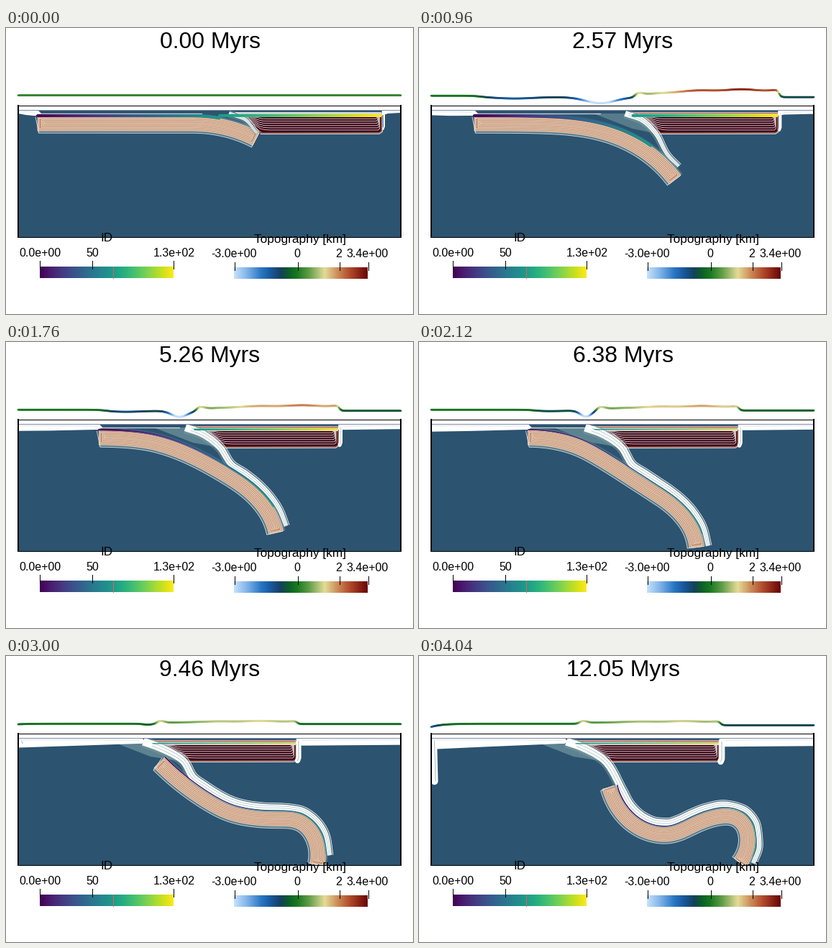
Write a matplotlib script that moves like this. It is 566 px wide and 398 px high and loops after 4.08 s.

```python
import numpy as np
import matplotlib.pyplot as plt
from matplotlib.animation import FuncAnimation
from matplotlib.collections import LineCollection
from matplotlib.colors import LinearSegmentedColormap, Normalize
from matplotlib.patches import Polygon, Rectangle

W, H, DPI = 566, 398, 100
FRAMES, STEP = 102, 40
PX = 72 / DPI
LEFT, RIGHT, TOP, BOTTOM = 17, 549, 107.5, 290.5

MANTLE = "#2c5370"
TAN = "#c8936f"
MAROON = "#3c0618"
RED = "#b5503a"
TEAL = "#7fa3a6"
LINE = "#f4f1ee"

plt.rcParams["font.family"] = "Liberation Sans"
viridis = plt.get_cmap("viridis")
topo_cmap = LinearSegmentedColormap.from_list("topo", [
    (0, "#c4e0fa"), (.09, "#84b6ea"), (.2, "#2a77c4"), (.27, "#175a9e"),
    (.35, "#16405f"), (.40, "#0c5a2c"), (.47, "#17781f"), (.56, "#5f9c48"),
    (.68, "#e4dc98"), (.78, "#cb8a58"), (.87, "#b04a2c"), (1, "#6a0606")])


# ---------- maths ----------
def monotone(xk, v, xq):
    """Smooth interpolation without overshoot, column by column."""
    xk, xq = np.asarray(xk, float), np.atleast_1d(xq)
    v = np.asarray(v, float).reshape(len(xk), -1)
    d = np.diff(v, axis=0) / np.diff(xk)[:, None]
    prod, total = d[:-1] * d[1:], d[:-1] + d[1:]
    mid = np.where(prod > 0, 2 * prod / np.where(prod > 0, total, 1), 0)
    m = np.vstack([d[:1], mid, d[-1:]])
    i = np.clip(np.searchsorted(xk, xq, side="right") - 1, 0, len(xk) - 2)
    h = (xk[i + 1] - xk[i])[:, None]
    t = (xq - xk[i])[:, None] / h
    return (v[i] * (1 + 2 * t) * (1 - t) ** 2 + h * m[i] * t * (1 - t) ** 2
            + v[i + 1] * t * t * (3 - 2 * t) + h * m[i + 1] * t * t * (t - 1))


def bump(x, centre, width):
    return np.exp(-((x - centre) / width) ** 2)


def rise(x, centre, width):
    return .5 + .5 * np.tanh((x - centre) / width)


def curve(pts, n=100):
    pts = np.asarray(pts, float)
    s = np.r_[0, np.cumsum(np.hypot(*np.diff(pts, axis=0).T))]
    return monotone(s, pts, np.linspace(0, s[-1], n))


def offset(path, d):
    t = np.gradient(path, axis=0)
    t /= np.hypot(t[:, 0], t[:, 1])[:, None]
    return path + np.reshape(d, (-1, 1)) * np.c_[t[:, 1], -t[:, 0]]


def ring(path, d, inset=0):
    """Loop at distance d around a path, shortened at both ends."""
    k = int(inset / np.hypot(*(path[1] - path[0])))
    cut = slice(k, len(path) - k)
    return np.vstack([offset(path, d)[cut], offset(path, -d)[cut][::-1]])


# ---------- model ----------
KEYS = [0, 14, 34, 53, 66, 84, 101]
MYRS = [0, 1.23, 4.03, 6.38, 8.25, 10.54, 12.05]
RETREAT = [0, 9, 42, 79, 112, 122, 105]

# dip of the slab in degrees, evenly spaced from its rear to its tip,
# at a few amounts of convergence
CLOSURE = [0, 60, 107, 145, 221]
DIPS = [[0, 0, 0, 0, 0, 12, 28],
        [0, 1, 5, 17, 32, 49, 70],
        [0, 14, 30, 33, 33, 50, 84],
        [30, 32, 33, 22, 6, 52, 95],
        [75, 46, 11, -26, -8, 74, 130]]


class State:
    """Geometry of the model at one frame."""

    def __init__(self, f):
        self.t = t = monotone(KEYS, MYRS, f)[0, 0]
        back = monotone(KEYS, RETREAT, f)[0, 0]
        self.closure = 20 * (t - 1 + np.exp(-t))
        self.slab = self.slab_path()
        # overriding plate: upper left, lower left, right
        self.a = 328 - back
        self.b = self.a + 28 + .14 * back
        self.r = 522 - back
        # surface landmarks
        self.basin = 12 + 38 * np.exp(-(t / 5) ** 4)
        self.arc = 322 - .95 * back
        self.trench = self.arc - self.basin
        self.edge = min(self.slab[0, 0], self.trench - 8)

    def slab_path(self, n=170):
        dips = monotone(CLOSURE, DIPS, self.closure)[0]
        angle = np.radians(monotone(np.linspace(0, 1, 7), dips,
                                    np.linspace(0, 1, n))[:, 0])
        step = (307 - 1.9 * self.t) / (n - 1)
        start = 44 + self.closure, 133 + 1.45 * max(self.t - 6.2, 0) ** 2
        move = step * np.c_[np.cos(angle), np.sin(angle)][:-1]
        return start + np.vstack([[0, 0], np.cumsum(move, axis=0)])

    def channel(self):
        above = offset(self.slab, 16)
        deep = above[(above[:, 1] > 155) & (above[:, 0] > self.b - 4)]
        return curve([(self.a - 18, 119), (self.a + 4, 127),
                      (self.b - 7, 146), *deep[8::12]])

    def topography(self, x):
        t = self.t
        late = rise(t, 10.3, 1)
        u = np.clip((x - self.arc) / (self.r - self.arc), 0, 1)
        on_plate = rise(x, self.arc, 4) * rise(-x, -self.r - 2, 3)
        high = 1.1 + 2.1 * np.exp(-(t / 5.5) ** 2)
        land = .3 + (high - .3) * np.sin(np.pi / 2 * np.minimum(u / .7, 1))
        land += .12 * high * np.sin(19 * u) * u + bump(x, self.arc + 5, 9)
        flex = self.edge + .32 * (self.trench - self.edge)
        sea = 2.8 * rise(8.7, t, .8) * bump(x, self.trench, .55 * self.basin + 3)
        sea += 1.3 * np.exp(-(t / 7) ** 4) * rise(x, self.edge + 8, 12) * (
            .5 + .5 * bump(x, flex, 35))
        sea += 1.5 * late * np.exp((LEFT - x) / 15)
        sea += .7 * late * rise(x, self.r, 4)
        grown = 1 - np.exp(-t / .5)
        return .2 - .2 * grown + grown * (on_plate * land - (1 - on_plate) * sea)


# ---------- stage ----------
fig = plt.figure(figsize=(W / DPI, H / DPI), dpi=DPI, facecolor="white")
ax = fig.add_axes([0, 0, 1, 1])
ax.axis("off")


def label(x, y, s, size=16):
    return ax.text(x, y, s, fontsize=size * PX, ha="center", va="baseline",
                   color="black", zorder=30)


def color_bar(cmap, x, y, ticks, labels):
    ax.imshow(np.linspace(0, 1, 256)[None], cmap=cmap, aspect="auto",
              extent=(x, x + 186, y + 16, y))
    for tx in ticks:
        ax.plot([tx, tx], [y - 8, y + 3], color="black", lw=PX)
    for tx, s in labels:
        label(tx, y - 14.5, s)


color_bar(viridis, 47, 332, [46.5, 119.5, 232.5],
          [(47, "0.0e+00"), (120, "50"), (233.5, "1.3e+02")])
color_bar(topo_cmap, 317, 333.5, [317.5, 405.5, 463.5, 503.5],
          [(317.5, "-3.0e+00"), (405, "0"), (463, "2"), (503, "3.4e+00")])
ax.plot([148.5, 148.5], [332, 348], color="#e0605c", lw=PX)
label(140, 297, "ID", 17)
label(409, 299, "Topography [km]", 17.2)
title = label(283.5, 28, "", 32)

box = Rectangle((LEFT, TOP), RIGHT - LEFT, BOTTOM - TOP, fc=MANTLE, ec="none")
ax.add_patch(box)
for y in (TOP, BOTTOM):
    ax.plot([LEFT, RIGHT], [y, y], color="black", lw=PX, zorder=20)
for x in (LEFT, RIGHT):
    ax.plot([x, x], [TOP, BOTTOM], color="black", lw=2 * PX, zorder=20)
ax.set(xlim=(0, W), ylim=(H, 0))

live = []


def keep(artist, clip=True):
    if clip:
        artist.set_clip_path(box)
    live.append(artist)


def fill(pts, color, alpha=1.0, z=3):
    keep(ax.add_patch(Polygon(pts, fc=color, ec="none", alpha=alpha, zorder=z)))


def stroke(pts, color, w=1.0, alpha=1.0, z=3):
    pts = np.asarray(pts)
    keep(ax.plot(pts[:, 0], pts[:, 1], color=color, lw=w * PX, alpha=alpha,
                 zorder=z, solid_capstyle="round", solid_joinstyle="round")[0])


def shaded(pts, values, cmap, norm, w, clip=True):
    segs = np.stack([pts[:-1], pts[1:]], axis=1)
    lc = LineCollection(segs, cmap=cmap, norm=norm, linewidths=w * PX,
                        zorder=12, capstyle="round")
    lc.set_array((values[:-1] + values[1:]) / 2)
    lc.set_snap(False)
    keep(ax.add_collection(lc, autolim=False), clip)


def draw_slab(s):
    fill([(s.a - 62, 119), (s.a - 12, 119), (s.b - 6, 147), (s.a - 8, 140)],
         TEAL, .6 * min(s.t / 3, 1))
    for d, alpha in ((14, .15), (12.8, .3), (11.8, .5)):
        fill(ring(s.slab, d), TEAL, alpha)
    fill(ring(s.slab, 10.5), TAN)
    for d in (9.8, 7.6, 5.4, 3.2, 1):
        loop = ring(s.slab, d, 11 - d)
        stroke(np.vstack([loop, loop[:1]]), LINE, .8, .85)
    under, head = offset(s.slab, -13.2), offset(s.slab, 9)
    stroke(np.vstack([head[:1] - [3, 0], under[1:], offset(s.slab, 9)[-1:]]),
           LINE, .9, .85)


def draw_plate(s):
    a, b, r = s.a, s.b, s.r
    body = [(a, 123.5), (r, 123.5), (r, 144), (r - 3, 145.5), (b, 146)]
    loop = np.array(body + body[:1])
    stroke(loop, TEAL, 5, .4)
    fill(body, MAROON)
    stroke(loop, RED, 1.2)
    for u in np.linspace(.12, .9, 6):
        y, gap = 124 + 20 * u, 22 * (1 - u)
        x, end = a + (b - a) * u + gap, r - 2 - gap / 5
        stroke([(a + 2 + gap * .8, 124), (x - 2, y - 2), (x + 5, y - .3),
                (x + 12, y), (end - 2, y), (end, y - 2), (end, 124)],
               LINE, .8, .9)
    stroke([(b - 2, 147.5), (r - 3, 147.3), (r + 1.5, 144), (r + 2, 122)],
           LINE, .9, .9)
    fill([(a - 10, 117), (r, 117), (r, 123.5), (a, 123.5)], LINE, .85)
    stroke([(a - 12, 118), (r - 1, 118)], RED, 1.3, min(1, s.t / 3))
    stroke([(a - 8, 119.8), (r - 1, 119.8)], TEAL, .7)


def draw_channel(s):
    path = s.channel()
    width = 5 + 5 * min(s.t / 6, 1)
    half = width / 2 * np.linspace(1.1, .6, len(path))
    fill(np.vstack([offset(path, half + 2), offset(path, -half - 3)[::-1]]),
         TEAL, .45)
    fill(np.vstack([offset(path, half), offset(path, -half)[::-1]]), "white")
    for c in (-.35, .4):
        stroke(offset(path, c * half)[4:], TEAL, .6, .8)
    stroke(offset(path, half + 1.8)[15:], LINE, .8)


def draw_crust(s):
    end, r, t = s.edge, s.r, s.t
    base = 119 + .9 * t
    fill([(LEFT, TOP), (RIGHT, TOP), (RIGHT, 114.5), (LEFT, 114.5)], "white", z=6)
    fill([(LEFT, 114), (end, 114), (end + 5, 119), (end, 122), (end - 6, 122),
          (.6 * LEFT + .4 * end, (base + 123) / 2), (LEFT, base)], "white", z=6)
    fill([(RIGHT, 114), (r + 1, 114), (r, 122), (r + 9, 119 + .6 * t),
          (RIGHT, 118 + .6 * t)], "white", z=6)
    stroke([(end, 118.8), (s.trench, 118.8)], LINE, 1.3, .8, 6)
    stroke([(LEFT, 113.8), (RIGHT, 113.8)], "#75809f", .9, 1, 8)
    stroke([(LEFT, 116.5), (end - 3, 117)], TEAL, .5, .6, 8)
    stroke([(r + 8, 117), (RIGHT, 116.5)], TEAL, .5, .6, 8)
    # drips at the wall and behind the plate
    sink = 4.3 * max(t - 8.4, 0) ** 2
    if sink > 3:
        wall = np.array([(LEFT + 3, 118), (LEFT + 4.5, 117 + sink)])
        stroke(wall, "white", 10, z=6)
        stroke(wall + [1.5, 0], TEAL, .7, z=7)
    rear = np.array([(r + 4, 119), (r + 4, 137 + .5 * t), (r + 2.5, 141 + .5 * t)])
    stroke(rear, "white", 2 + .55 * t, z=6)
    stroke(rear, TEAL, .7, min(t / 8, 1), z=7)


def draw_markers(s):
    ids = Normalize(0, 130)
    thin = rise(s.t, 5.2, .5)
    w = 4 - 2.7 * thin
    n = int((.82 + .13 * thin) * len(s.slab))
    shaded(offset(s.slab, 11)[:n], np.linspace(0, 68, n), viridis, ids, w)
    x = np.linspace(s.a - 26 * np.exp(-s.t) - 5, s.r - 1, 60)
    shaded(np.c_[x, np.full(60, 121.8)], np.linspace(70, 130, 60),
           viridis, ids, w)


def draw(f):
    while live:
        live.pop().remove()
    s = State(f)
    title.set_text(f"{s.t:.2f} Myrs")
    x = np.linspace(LEFT, RIGHT, 267)
    km = s.topography(x)
    shaded(np.c_[x, 94.3 - 3 * km], km, topo_cmap, Normalize(-3, 3.4), 2.8,
           clip=False)
    draw_slab(s)
    draw_plate(s)
    draw_channel(s)
    draw_crust(s)
    draw_markers(s)
    return live


anim = FuncAnimation(fig, draw, frames=FRAMES, interval=STEP, repeat=True,
                     repeat_delay=0, init_func=lambda: draw(0), blit=False)
plt.show()
```
